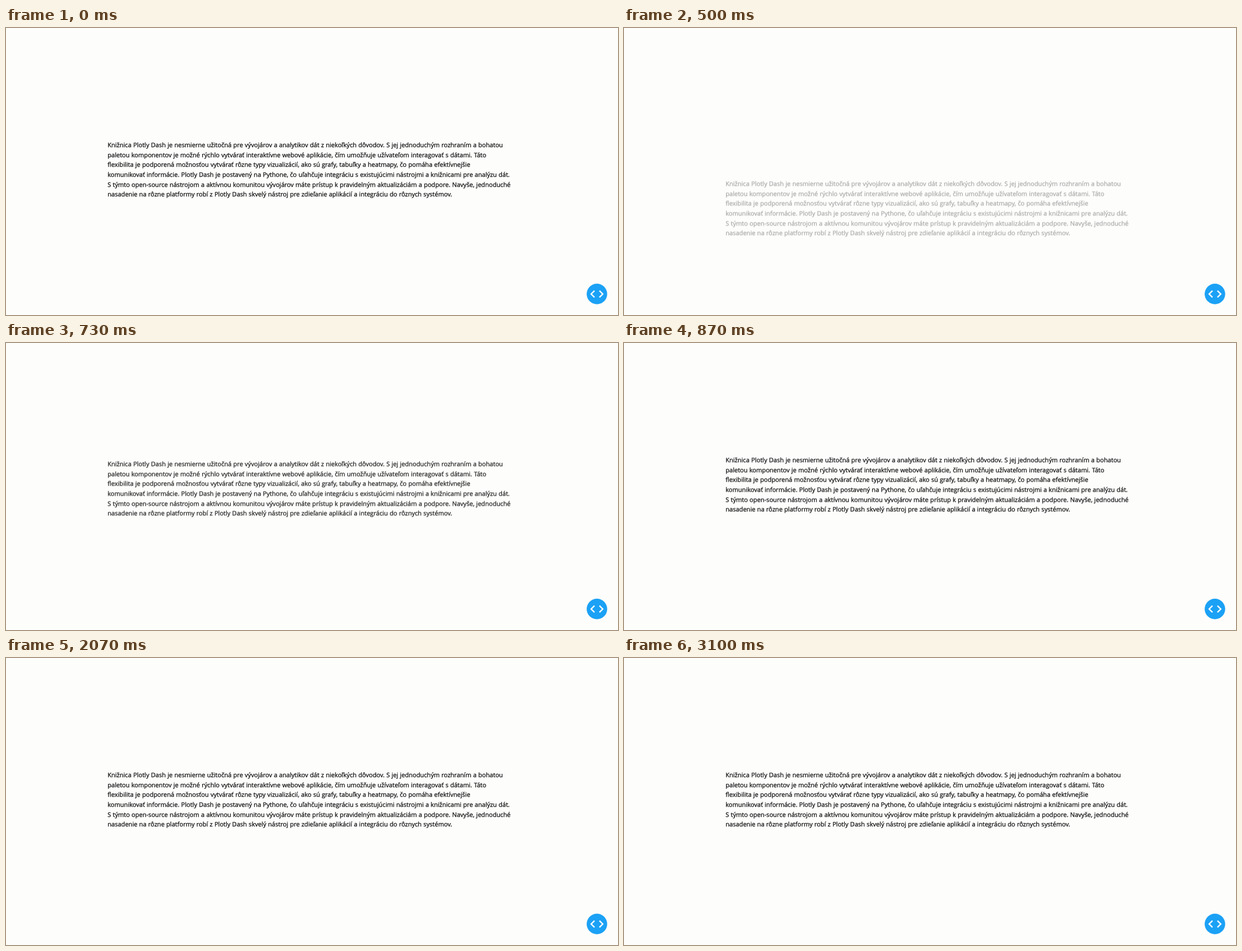
Recreate the animation shown at these times as an HTML page. Size 1092 px wide and 513 px high, loop 3.13 s.

```html
<!DOCTYPE html>
<html lang="sk">
<head>
<meta charset="utf-8">
<title>Plotly Dash</title>
<style>
  html, body { margin: 0; width: 100%; height: 100%; overflow: hidden; background: #fdfdfc; }
  svg { display: block; width: 1092px; height: 513px; }
  text {
    font: 400 11.09px "Open Sans", "Noto Sans", sans-serif;
    word-spacing: .32px;
    text-rendering: geometricPrecision;
    fill: #111;
    stroke: #111;
    stroke-width: .3px;
  }
  .chevrons { fill: none; stroke: #fff; stroke-width: 2.4; }
</style>
</head>
<body>
<svg viewBox="0 0 1092 513">
  <g id="story"></g>
  <circle cx="1054.4" cy="475.4" r="18.3" fill="#1ba1f5"/>
  <path class="chevrons" d="M1050 469.6l-5.9 5.9 5.9 5.9M1058.9 469.6l5.9 5.9-5.9 5.9"/>
</svg>
<script>
  const LOOP = 3130, HIDE = 100, RISE = 390, RISE_TIME = 500;
  const LEFT = 181.2, BASELINE = 213, LEADING = 17.65;

  const lines = [
    "Knižnica Plotly Dash je nesmierne užitočná pre vývojárov a analytikov dát z niekoľkých dôvodov. S jej jednoduchým rozhraním a bohatou",
    "paletou komponentov je možné rýchlo vytvárať interaktívne webové aplikácie, čím umožňuje užívateľom interagovať s dátami. Táto",
    "flexibilita je podporená možnosťou vytvárať rôzne typy vizualizácií, ako sú grafy, tabuľky a heatmapy, čo pomáha efektívnejšie",
    "komunikovať informácie. Plotly Dash je postavený na Pythone, čo uľahčuje integráciu s existujúcimi nástrojmi a knižnicami pre analýzu dát.",
    "S týmto open-source nástrojom a aktívnou komunitou vývojárov máte prístup k pravidelným aktualizáciám a podpore. Navyše, jednoduché",
    "nasadenie na rôzne platformy robí z Plotly Dash skvelý nástroj pre zdieľanie aplikácií a integráciu do rôznych systémov."
  ];

  const story = document.getElementById("story");
  lines.forEach((line, i) => {
    const text = document.createElementNS("http://www.w3.org/2000/svg", "text");
    text.setAttribute("x", LEFT);
    text.setAttribute("y", BASELINE + i * LEADING);
    text.textContent = line;
    story.append(text);
  });

  // The paragraph rises by its own height while fading in.
  const pose = (time, shown, easing = "linear") => ({
    offset: time / LOOP,
    opacity: shown,
    transform: `translateY(${(1 - shown) * lines.length * LEADING}px)`,
    easing
  });

  story.animate([
    pose(0, 1),
    pose(HIDE, 1),
    pose(HIDE, 0),
    pose(RISE, 0, "ease"),
    pose(RISE + RISE_TIME, 1),
    pose(LOOP, 1)
  ], { duration: LOOP, iterations: Infinity });
</script>
</body>
</html>
```
